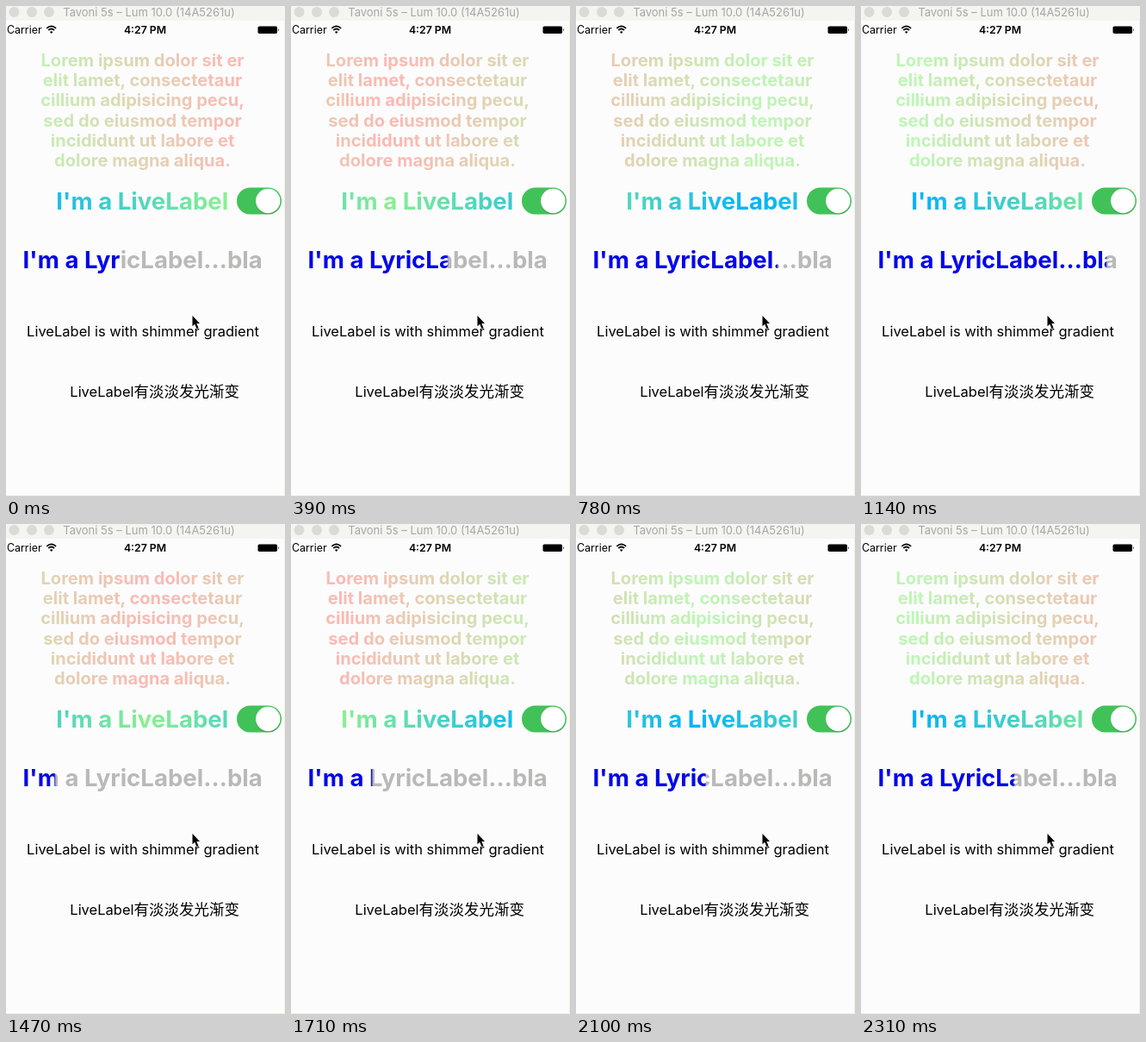
Animation, 324 px wide and 568 px high, one loop 2.34 s. Source, as an HTML page:

```html
<!DOCTYPE html>
<html lang="en">
<head>
<meta charset="utf-8">
<style>
  html, body { margin: 0; width: 100%; height: 100%; overflow: hidden; background: #fcfcfd; }
  svg { display: block; width: 324px; height: 568px; font-family: Inter, "Noto Sans CJK SC", "Noto Sans CJK", sans-serif; }
  .mid { text-anchor: middle; }
  .body { font-size: 16.5px; }
  .title { font-size: 27.6px; font-weight: 700; }
  .para { font-size: 20.1px; font-weight: 700; }
</style>
</head>
<body>
<svg viewBox="0 0 324 568">
  <defs>
    <linearGradient id="warm" gradientUnits="userSpaceOnUse" spreadMethod="reflect" x1="0" x2="270">
      <stop stop-color="#bcf7b4"/>
      <stop offset="1" stop-color="#fdb8b2"/>
    </linearGradient>
    <linearGradient id="cool" gradientUnits="userSpaceOnUse" spreadMethod="reflect" x1="0" x2="240">
      <stop stop-color="#00b2fc"/>
      <stop offset="1" stop-color="#8af090"/>
    </linearGradient>
    <linearGradient id="lyric" gradientUnits="userSpaceOnUse" x1="-1" x2="1">
      <stop stop-color="#0406e8"/>
      <stop offset="1" stop-color="#b9b9b8"/>
    </linearGradient>
  </defs>

  <!-- window bar -->
  <rect width="324" height="17" fill="#f4f4f0"/>
  <g fill="#dbdad6">
    <circle cx="9.5" cy="7" r="6"/><circle cx="30" cy="7" r="6"/><circle cx="50" cy="7" r="6"/>
  </g>
  <text class="mid" x="166" y="12" font-size="13" fill="#a6a6a6">Tavoni 5s – Lum 10.0 (14A5261u)</text>
  <path d="M323.5 17V567.5H0" fill="none" stroke="#f0efe0"/>

  <!-- status bar -->
  <text x="1" y="32" font-size="12.4">Carrier</text>
  <text class="mid" x="161.5" y="32" font-size="12.3" font-weight="600">4:27 PM</text>
  <g fill="none" stroke="#000" stroke-width="1.7">
    <path d="M47.3 25.8Q52.7 20.8 58.1 25.8M49.3 28Q52.7 25 56.1 28"/>
    <path d="M52.7 32L50.9 29.9Q52.7 28.5 54.5 29.9Z" fill="#000" stroke="none"/>
  </g>
  <rect x="292.5" y="23.5" width="22.5" height="8.5" rx="1.8"/>
  <path d="M316 26q1.8 1.7 0 3.6z"/>

  <!-- labels -->
  <g id="para" class="para mid" fill="url(#warm)"></g>
  <text class="title mid" x="158.3" y="236" fill="url(#cool)">I'm a LiveLabel</text>
  <text class="title mid" x="158.7" y="304" fill="url(#lyric)">I'm a LyricLabel…bla</text>
  <text class="body mid" x="159" y="382.5">LiveLabel is with shimmer gradient</text>
  <text class="body" x="74.3" y="453">LiveLabel<tspan font-size="17.5">有淡淡发光渐变</tspan></text>

  <!-- switch -->
  <rect x="268" y="210.5" width="52" height="31" rx="15.5" fill="#41c258"/>
  <circle cx="304.3" cy="227.2" r="14.2" fill="#000" opacity=".16"/>
  <circle cx="304.3" cy="226" r="14.2" fill="#fff"/>

  <!-- pointer -->
  <path d="M216.5 359V371.2L219.2 368.7L221.5 374.2L223.6 373.3L221.3 368H225Z" stroke="#fff" paint-order="stroke"/>
</svg>
<script>
  const LOOP = 2340, STEP = 30;
  const LEFT = 20, TEXT_WIDTH = 277;       // extent of the lyric line
  const CREST = 285, WAVE = 170;           // colour wave, measured in lyric travel
  const byId = id => document.getElementById(id);

  const lines = ["Lorem ipsum dolor sit er", "elit lamet, consectetaur", "cillium adipisicing pecu,",
    "sed do eiusmod tempor", "incididunt ut labore et", "dolore magna aliqua."];
  byId("para").innerHTML = lines
    .map((line, i) => `<text x="158.5" y="${70 + i * 23.2}">${line}</text>`).join("");

  // [time, distance] of the lyric sweep; its uneven pace also drives the colours
  const pace = [[0, 132], [390, 182], [780, 234], [1140, 285], [1470, 334],
    [1920, 404], [2310, 455], [2340, 459]];

  function travelAt(t) {
    const i = pace.findIndex(point => point[0] > t);
    const [t0, d0] = pace[i - 1], [t1, d1] = pace[i];
    return d0 + (d1 - d0) * (t - t0) / (t1 - t0);
  }

  const shift = (id, x) => byId(id).setAttribute("gradientTransform", `translate(${x})`);

  function draw(now) {
    const travel = travelAt(Math.floor(now % LOOP / STEP) * STEP);
    const phase = (CREST - travel) / WAVE;
    shift("warm", 60 + 540 * phase);
    shift("cool", 62 + 480 * phase);
    shift("lyric", LEFT + (travel - LEFT) % TEXT_WIDTH);
  }

  const start = performance.now();
  function tick() {
    draw(performance.now() - start);
    requestAnimationFrame(tick);
  }
  tick();
</script>
</body>
</html>
```
